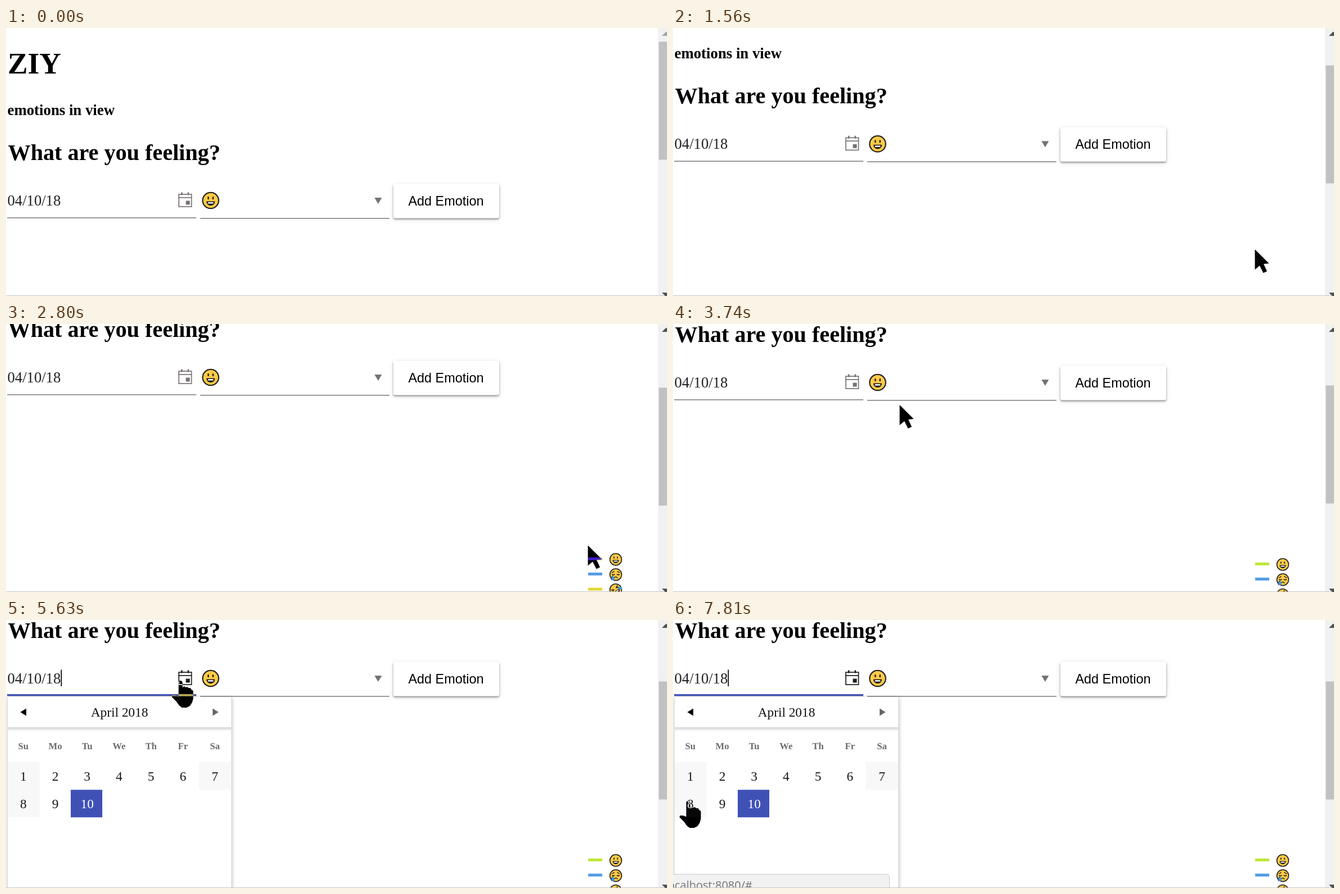
Animation, 1174 px wide and 477 px high, one loop 8 s. Source, as an HTML page with a canvas:

```html
<!DOCTYPE html>
<html lang="en">
<head>
<meta charset="utf-8">
<title>Emotion diary</title>
<style>
html, body { margin: 0; width: 100%; height: 100%; overflow: hidden; background: #fff; }
canvas { display: block; width: 1174px; height: 477px; }
</style>
</head>
<body>
<canvas id="stage" width="1174" height="477"></canvas>
<script>
const W = 1174, H = 477, LOOP = 8000;
const c = document.getElementById('stage').getContext('2d');
const SERIF = '"Liberation Serif", "Times New Roman", serif';
const SANS = '"Liberation Sans", Arial, sans-serif';
const INDIGO = '#3f51b5', INK = '#1b1a1c', GREY = '#777276';

// Timelines: [start, values...]
const scrollSteps = [[0, 0], [1250, 49], [1560, 100.7], [1860, 140], [2170, 222], [2800, 212], [3120, 203]];
const caretSteps = [[0, 0], [5320, 1], [5960, 0], [6540, 1], [6870, 0], [7500, 1]];
const cursorSteps = [
  [0, null], [310, 'arrow', 1050, 461], [950, 'arrow', 1034, 394],
  [3440, 'arrow', 685, 224], [3740, 'arrow', 403, 144], [4070, 'arrow', 385, 139],
  [4370, 'hand', 286, 86], [4700, 'hand', 295, 108], [6220, 'hand', 147, 172],
  [6540, 'arrow', 164, 250], [6870, 'hand', 102, 301], [7180, 'hand', 29, 322],
  [7500, 'hand', 12, 322]
];
const HOVER = 4370, OPENING = 5320, OPEN = 5630, STATUS = 7810;

function at(steps, t) {
  let cur = steps[0];
  for (const s of steps) if (s[0] <= t) cur = s;
  return cur.slice(1);
}

function box(x, y, w, h, color) {
  c.fillStyle = color;
  c.fillRect(x, y, w, h);
}

function poly(points, color) {
  c.beginPath();
  for (let i = 0; i < points.length; i += 2) c.lineTo(points[i], points[i + 1]);
  c.closePath();
  c.fillStyle = color;
  c.fill();
}

function text(str, x, y, size, color = '#000', { font = SERIF, weight = '', align = 'left' } = {}) {
  c.font = `${weight} ${size}px ${font}`;
  c.textAlign = align;
  c.fillStyle = color;
  c.fillText(str, x, y);
}

function shadowed(dy, blur, alpha, draw) {
  c.save();
  c.shadowColor = `rgba(0,0,0,${alpha})`;
  c.shadowOffsetY = dy;
  c.shadowBlur = blur;
  draw();
  c.restore();
}

function oval(x, y, rx, ry, color, tilt = 0) {
  c.beginPath();
  c.ellipse(x, y, rx, ry, tilt, 0, Math.PI * 2);
  c.fillStyle = color;
  c.fill();
}

function stroke(path, width, color = INK) {
  c.strokeStyle = color;
  c.lineWidth = width;
  c.lineCap = 'round';
  c.stroke(new Path2D(path));
}

// Faces are drawn in a unit space of radius 15.
function face(x, y, r, mood) {
  c.save();
  c.translate(x, y);
  c.scale(r / 15, r / 15);
  if (mood === 'rofl') c.rotate(-0.65);
  oval(0, 0, 15.3, 15.3, INK);
  oval(0, 0, 13.2, 13.2, '#fdca46');
  if (mood === 'happy') {
    oval(-4.2, -4.5, 1.3, 2.7, INK);
    oval(4.2, -4.5, 1.3, 2.7, INK);
    c.fillStyle = INK;
    c.fill(new Path2D('M-7.5 1.5H7.5C7.5 11.5-7.5 11.5-7.5 1.5Z'));
    c.fillStyle = '#fff';
    c.fill(new Path2D('M-4.8 3H4.8V5.5H-4.8Z'));
  } else if (mood === 'sad') {
    stroke('M-9-5Q-6-5.5-4-8M9-5Q6-5.5 4-8', 1.8);
    stroke('M-8.5-.5Q-6 2-3-.5M8.5-.5Q6 2 3-.5', 2);
    stroke('M-4 8Q0 3.5 4 8', 2);
    c.fillStyle = '#3d9be9';
    c.fill(new Path2D('M-7 2Q-14 9-10 13Q-3 16-3 9Q-4 5-7 2Z'));
    stroke('M-7 2Q-14 9-10 13', 1.2);
  } else {
    stroke('M-9-6L-4-3L-9-1M9-6L4-3L9-1', 2);
    c.fillStyle = INK;
    c.fill(new Path2D('M-8 2H8C8 13-8 13-8 2Z'));
    c.fillStyle = '#fff';
    c.fill(new Path2D('M-6 3.3H6L5 5.5H-5Z'));
    oval(-11, 3.5, 3.2, 4.8, '#3d9be9', 0.5);
    oval(11, 3.5, 3.2, 4.8, '#3d9be9', -0.5);
  }
  c.restore();
}

function calendarIcon(x, y, color) {
  c.strokeStyle = color;
  c.lineWidth = 1.7;
  c.strokeRect(x + 1, y + 3, 22.5, 22);
  box(x, y + 8, 24, 1.7, color);
  box(x + 5, y - 0.5, 2.5, 5, color);
  box(x + 16.5, y - 0.5, 2.5, 5, color);
  box(x + 13.5, y + 14.5, 7, 7, color);
}

function button() {
  const plate = () => {
    c.beginPath();
    c.roundRect(688, 277.5, 188, 61, 3);
    c.fillStyle = '#fff';
    c.fill();
  };
  shadowed(2, 8, 0.14, plate);
  shadowed(2, 3, 0.38, plate);
  text('Add Emotion', 714.5, 316, 23.4, '#000', { font: SANS });
}

function page(t, scroll) {
  const active = t >= HOVER, focused = t >= OPENING;
  c.save();
  c.translate(0, -scroll);
  text('ZIY', 3, 81, 53.33, '#000', { weight: 'bold' });
  text('emotions in view', 2.5, 155, 26.8, '#000', { weight: 'bold' });
  text('What are you feeling?', 3.5, 234.5, 40.15, '#000', { weight: 'bold' });

  text('04/10/18', 2.5, 316, 26.67, '#212121');
  calendarIcon(306, 293, active ? INK : GREY);
  if (focused) box(2, 335, 336, 3.4, INDIGO);
  else box(2, 337, 336, 1.7, active ? '#111' : '#8b888b');
  if (at(caretSteps, t)[0]) box(97.4, 291.5, 1.7, 29.5, '#000');

  face(363.5, 307, 15, 'happy');
  poly([654.5, 302, 667.5, 302, 661, 313], GREY);
  box(345, 338, 336, 1.7, '#8b888b');
  button();

  [['#bde636', 'happy'], ['#519be4', 'sad'], ['#e2d636', 'rofl']].forEach(([color, mood], i) => {
    const y = 631 + i * 27;
    box(1034, y - 3.5, 25, 5, color);
    face(1083, y, 11, mood);
  });
  c.restore();
}

function panel(height) {
  shadowed(2, 7, 0.35, () => box(2.5, 137, 398, height, '#fff'));
  box(2, 137, 1, height, '#dcdcdc');
  box(400, 137, 1, height, '#dcdcdc');
}

function calendar(t) {
  panel(t < OPEN ? 122 : 400);
  if (t < OPEN) return;
  const mid = { align: 'center' };

  const fade = c.createLinearGradient(0, 191, 0, 198);
  fade.addColorStop(0, '#d2d2d2');
  fade.addColorStop(1, '#fff');
  box(3, 191, 397, 7, fade);

  if (t >= 6220 && t < 6540) {
    c.beginPath();
    c.roundRect(59, 142, 285, 43, 3);
    c.fillStyle = '#dedede';
    c.fill();
  }
  text('April 2018', 201.5, 171.5, 23.33, '#111', mid);
  poly([36, 157.5, 36, 170.5, 25.5, 164], '#000');
  poly([367, 157.5, 367, 170.5, 377.5, 164], '#666');

  const colX = i => 30.8 + i * 56.7;
  ['Su', 'Mo', 'Tu', 'We', 'Th', 'Fr', 'Sa'].forEach((d, i) =>
    text(d, colX(i), 229.5, 16.67, '#6b6b6b', { weight: 'bold', align: 'center' }));

  for (let day = 1; day <= 10; day++) {
    const col = (day - 1) % 7, row = Math.floor((day - 1) / 7);
    const y = 253 + row * 49.2, picked = day === 10;
    if (col % 6 === 0) box(col ? 342.5 : 3, y, 56.5, 49, '#f8f8f8');
    if (picked) box(115, y, 56, 49, INDIGO);
    text(day, colX(col), y + 32.8, 23.33, picked ? '#fff' : '#161616', mid);
  }
}

function scrollbar(scroll) {
  box(1158, 0, 16, H, '#f1f1f1');
  box(1159.5, 24.4 + scroll * 0.419, 14.5, 210, '#c1c1c1');
  poly([1172.5, 6.5, 1181, 14, 1165, 14], scroll ? '#505050' : '#a3a3a3');
  box(0, 476, W, 1, '#c4c4c4');
  poly([1165, 471, 1181, 471, 1173, 479], '#505050');
}

function statusBar() {
  c.beginPath();
  c.roundRect(-8, 452.5, 392.5, 40, 5);
  c.fillStyle = '#f2f2f2';
  c.fill();
  c.strokeStyle = '#c9c9c9';
  c.lineWidth = 1;
  c.stroke();
  text('localhost:8080/#', 141, 479, 20, '#757575', { font: '"Open Sans", "Noto Sans", sans-serif', align: 'right' });
}

const shapes = {
  arrow: [0, 0, 25, 25, 15.5, 26, 21.5, 39, 15, 42, 8.5, 29, 0, 36],
  hand: [12, 2, 14, 0, 17, 0, 19, 3, 19, 12, 22, 10, 25, 12, 27, 11, 30, 13, 33, 13, 35, 16, 38, 18,
    38, 32, 36, 39, 32, 45, 26, 48, 18, 48, 13, 44, 8, 37, 0, 29, 1, 26, 6, 26, 12, 28]
};

// The pointer inverts whatever lies under it.
function cursor(t) {
  const [kind, x, y] = at(cursorSteps, t);
  if (!kind) return;
  c.save();
  c.translate(x - 0.5, y);
  c.globalCompositeOperation = 'difference';
  poly(shapes[kind], '#fff');
  c.restore();
}

function draw(t) {
  const [scroll] = at(scrollSteps, t);
  box(0, 0, W, H, '#fff');
  page(t, scroll);
  if (t >= OPENING) calendar(t);
  if (t >= STATUS) statusBar();
  scrollbar(scroll);
  cursor(t);
}

const start = performance.now();
function tick() {
  draw((performance.now() - start) % LOOP);
  requestAnimationFrame(tick);
}
tick();
</script>
</body>
</html>
```
